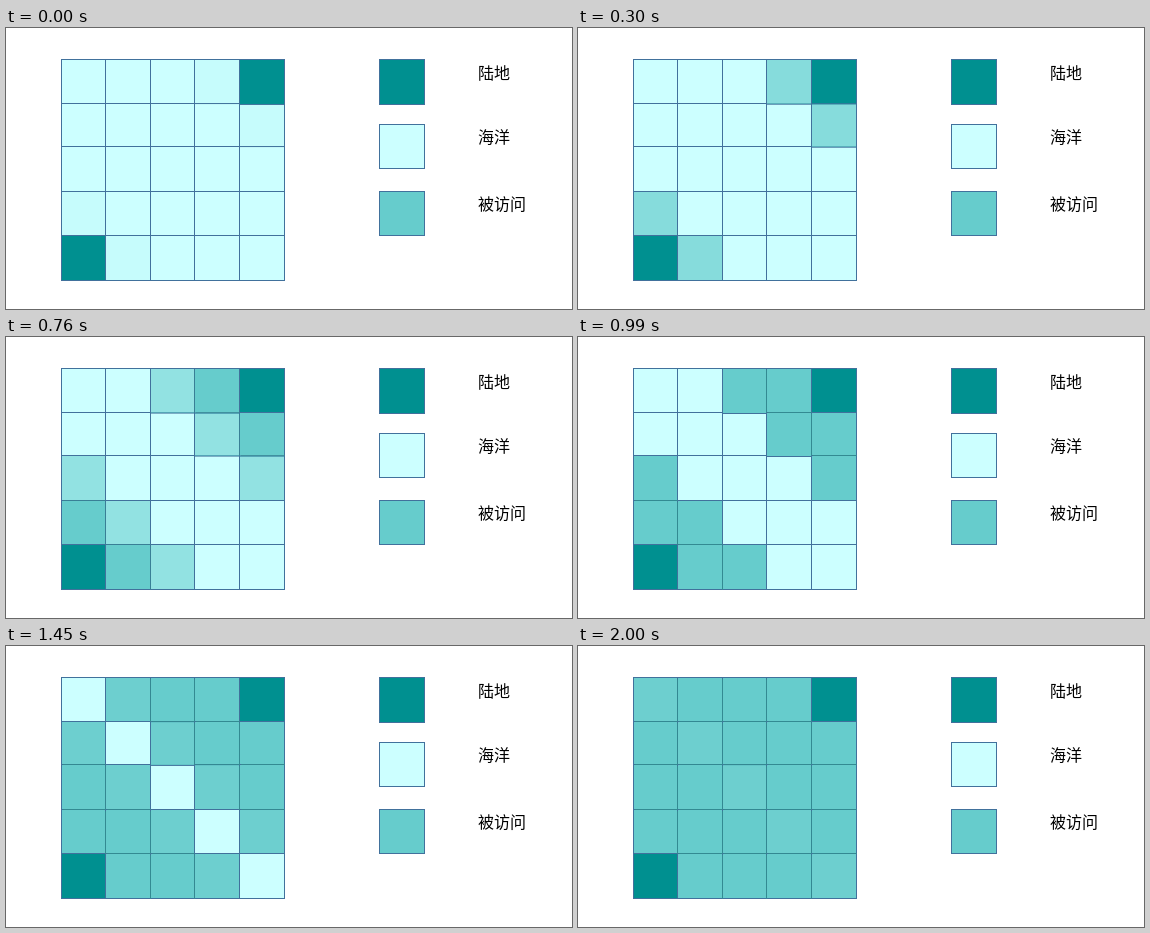
These frames come from a looping animation (566 by 281 pixels, 2770 ms). An HTML page:

```html
<!DOCTYPE html>
<html lang="zh-CN">
<head>
<meta charset="utf-8">
<title>Grid flood</title>
<style>
  html, body { margin: 0; width: 100%; height: 100%; overflow: hidden; background: #fff; }
  svg { display: block; }
  rect, line { shape-rendering: crispEdges; stroke-width: 1; }
  text { font: 16px "Noto Sans CJK SC", "Noto Sans CJK", sans-serif; fill: #000; }
</style>
</head>
<body>
<svg id="stage" width="566" height="281" viewBox="0 0 566 281"></svg>
<script>
const LOOP = 2770;
const N = 5;
const xs = [55, 99, 144, 188, 233, 278];
const ys = [31, 75, 118, 163, 207, 252];
const LAND = '#009090', SEA = '#ccffff', VISITED = '#66cccc';
const EDGE = '#41719c', SEAM = '#338a92';

// The picture only changes at these times; each wave fades in linearly.
const ticks = [0, 70, 150, 220, 300, 380, 450, 610, 680, 760, 840, 910, 990,
  1140, 1220, 1300, 1370, 1450, 1680, 1830, 1910, 2000];
const starts = [-24, 491, 1011, 1557];
const RATE = 0.0021;

const stage = document.getElementById('stage');

function add(tag, attrs, text) {
  const el = document.createElementNS('http://www.w3.org/2000/svg', tag);
  for (const key in attrs) el.setAttribute(key, attrs[key]);
  if (text) el.textContent = text;
  stage.appendChild(el);
  return el;
}

function box(x, y, x2, y2, fill) {
  return add('rect', { x: x + 0.5, y: y + 0.5, width: x2 - x, height: y2 - y, fill, stroke: EDGE });
}

function cell(r, c, fill, extra = 0) {
  return box(xs[c], ys[r], xs[c + 1], ys[r + 1] + extra, fill);
}

function seam(x1, y1, x2, y2) {
  return add('line', { x1: x1 + 0.5, y1: y1 + 0.5, x2: x2 + 0.5, y2: y2 + 0.5, stroke: SEAM });
}

function legend(y, y2, fill, label, baseline) {
  box(373, y, 418, y2, fill);
  add('text', { x: 472, y: baseline }, label);
}

const each = fn => {
  for (let r = 0; r < N; r++) for (let c = 0; c < N; c++) fn(r, c);
};
// Steps from the nearest land corner
const distance = (r, c) => N - 1 - Math.abs(r - c);

const fades = [];

each((r, c) => cell(r, c, SEA));
cell(4, 0, LAND);
cell(0, 4, LAND, 1);

for (let d = 1; d < N; d++) {
  each((r, c) => {
    if (distance(r, c) !== d) return;
    const extra = r < 2 && c > 1 ? 1 : 0;
    fades.push({ el: cell(r, c, VISITED, extra), wave: d });
  });
}

// Shared edges follow the later of their two cells.
each((r, c) => {
  const d = distance(r, c);
  if (!d) return;
  if (c < N - 1 && distance(r, c + 1)) {
    const el = seam(xs[c + 1], ys[r] + 1, xs[c + 1], ys[r + 1]);
    fades.push({ el, wave: Math.max(d, distance(r, c + 1)) });
  }
  if (r < N - 1 && distance(r + 1, c)) {
    const el = seam(xs[c] + 1, ys[r + 1], xs[c + 1], ys[r + 1]);
    fades.push({ el, wave: Math.max(d, distance(r + 1, c)) });
  }
});

legend(31, 76, LAND, '陆地', 51);
legend(96, 140, SEA, '海洋', 115);
legend(163, 207, VISITED, '被访问', 182);

function draw(ms) {
  const t = ticks.filter(k => k <= ms).pop();
  const alpha = starts.map(s => Math.min(1, Math.max(0, (t - s) * RATE)));
  for (const { el, wave } of fades) el.setAttribute('opacity', alpha[wave - 1]);
}

let origin = null;
function frame(now) {
  if (origin === null) origin = now;
  draw(Math.max(0, now - origin) % LOOP);
  requestAnimationFrame(frame);
}
draw(0);
requestAnimationFrame(frame);
</script>
</body>
</html>
```
